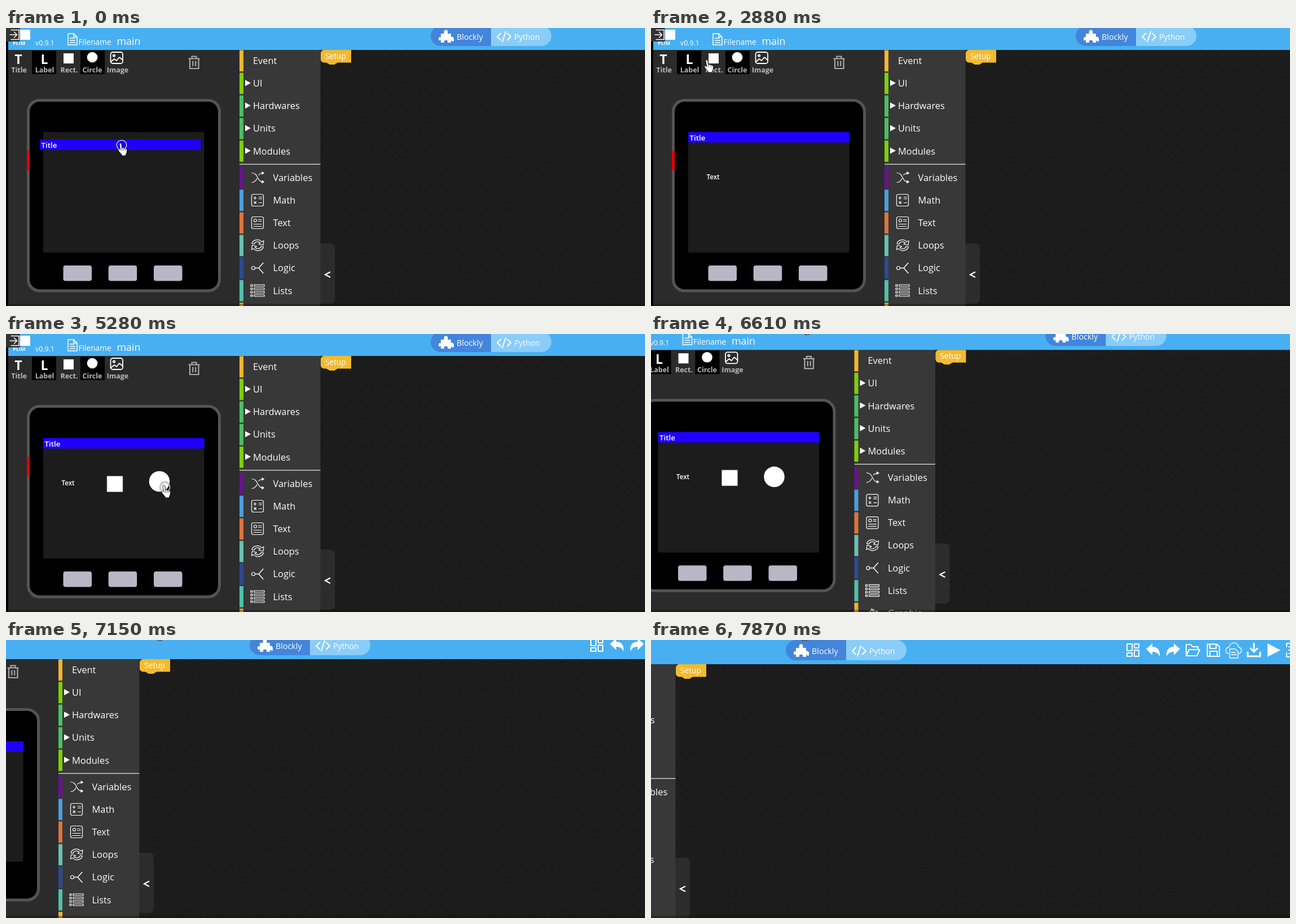
Write an HTML page that moves like this. It is 1133 by 494 pixels and loops after 7.99 s.

```html
<!DOCTYPE html>
<html lang="en">
<head>
<meta charset="utf-8">
<title>Block editor</title>
<style>
  html, body { margin: 0; width: 100%; height: 100%; overflow: hidden; background: #1c1c1c; }
  svg { display: block; width: 1133px; height: 494px; }
  text { font-family: "Open Sans", "Noto Sans", sans-serif; fill: #fff; }
  .line { fill: none; stroke: #fff; stroke-width: 1.2; stroke-linecap: round; stroke-linejoin: round; }
  .thick { stroke-width: 2; }
  .menu { font-size: 16.4px; }
  .tool { font-size: 12.5px; font-weight: 700; fill: #b9b9b9; text-anchor: middle; }
  .glyph { font-size: 23px; font-weight: 700; text-anchor: middle; }
  .white { fill: #fff; }
</style>
</head>
<body>
<svg viewBox="0 0 1133 494">
  <defs>
    <pattern id="dots" x="566" y="47" width="17.85" height="17.85" patternUnits="userSpaceOnUse">
      <rect width="1" height="1" fill="#4a4a4a"/>
    </pattern>
  </defs>

  <g id="page">
    <!-- workspace -->
    <rect x="557" y="39" width="1200" height="500" fill="#1c1c1c"/>
    <rect x="559" y="41" width="1200" height="500" fill="url(#dots)"/>
    <path d="M557 383h18a8 8 0 0 1 8 8v91a8 8 0 0 1-8 8h-18z" fill="#2c2c2c"/>
    <path class="line" d="M575 433.5l-9 4.7 9 4.7" style="stroke-width:2.2;stroke-linecap:butt;stroke-linejoin:miter"/>
    <path d="M558 45a6 6 0 0 1 6-6h48v22.500h-24l-6 3.500h-8l-6-3.500h-4a6 6 0 0 1-6-6z" fill="#f3ba2f"/>
    <text x="566" y="55" font-size="13.7">Setup</text>

    <!-- designer -->
    <rect x="0" y="39" width="414" height="500" fill="#2b2b2b"/>
    <path d="M46 40h43v42h-43zM132 40h43v42h-43z"/>
    <text class="glyph" x="22" y="64">T</text>
    <text class="glyph" x="68" y="64">L</text>
    <rect class="white" x="102" y="45" width="18" height="18"/>
    <circle class="white" cx="153" cy="52" r="9.300"/>
    <g class="line" style="stroke-width:1.8">
      <rect x="185.500" y="43" width="21.500" height="20" rx="3.500"/>
      <circle cx="191.500" cy="49" r="1.700"/>
      <path d="M186 60l6-5 4 3 5-6 6 5"/>
    </g>
    <text class="tool" x="23" y="79">Title</text>
    <text class="tool" x="68.500" y="79">Label</text>
    <text class="tool" x="112" y="79">Rect.</text>
    <text class="tool" x="153" y="79">Circle</text>
    <text class="tool" x="198" y="79">Image</text>
    <path class="line" d="M323.500 54.500h20M329.500 54v-3.500h8v3.500M326 55v17h15.500v-17M331.300 58.500v9.500M336.200 58.500v9.500"
      style="stroke:#a9a9a9;stroke-width:2.2;stroke-linecap:butt;stroke-linejoin:miter"/>

    <rect x="39.500" y="128.500" width="339" height="338.500" rx="20" stroke="#545454" stroke-width="5"/>
    <rect x="37" y="218" width="5" height="35" fill="#e80000"/>
    <rect x="66" y="185" width="285.500" height="214" fill="#1c1c1c"/>
    <g fill="#b9b6c5">
      <rect x="101.500" y="422" width="50.500" height="27.500" rx="4"/>
      <rect x="181.700" y="422" width="50.500" height="27.500" rx="4"/>
      <rect x="262" y="422" width="50.500" height="27.500" rx="4"/>
    </g>
    <g id="title">
      <rect width="285.500" height="18.500" fill="#1f00ff"/>
      <text x="2.500" y="15" font-size="13.3" font-weight="600">Title</text>
    </g>
    <text id="label" y="10" font-size="11.6" font-weight="600">Text</text>
    <rect id="rect" class="white" width="28" height="28" stroke="#999" stroke-width=".6"/>
    <circle id="disc" class="white" r="18.300"/>

    <!-- block menu -->
    <rect x="414" y="39" width="143.500" height="500" fill="#383838"/>
    <g id="menu"></g>
    <rect x="414" y="241.500" width="143.500" height="1.200" fill="#eee"/>
    <g class="line">
      <path d="M436 257.500c12 0 8 16 20 16M436 274.500c5 0 7-3 9-7M448 261c2-2 4-3 8-3"/>
      <path class="white" d="M454 255.500l4 2.300-4 2.300zM454 271l4 2.400-4 2.300z" style="stroke-width:.6"/>
      <rect x="435.500" y="295.500" width="21" height="21" rx="3"/>
      <path d="M439 302h5M441.500 299.500v5M448.500 300.500h5M448.500 303.500h5M440 308.500l3.500 3.500M443.500 308.500l-3.500 3.500M448.500 310.500h5"/>
      <rect x="435.500" y="335.500" width="21" height="21" rx="3"/>
      <circle cx="442" cy="342" r="2.500"/>
      <path d="M447.500 340.500h5.500M447.500 343.500h5.500M439 348.500h14M439 352.500h14"/>
      <path d="M436 383c2-7 13-9 17-3l4-2-1 8-8-2 3-2c-4-4-10-2-11 2zM456.500 389c-2 7-13 9-17 3l-4 2 1-8 8 2-3 2c4 4 10 2 11-2z"/>
      <circle cx="438.500" cy="426.500" r="3"/>
      <path d="M442 426.500h6l8-9M448 426.500l8 9" style="stroke-width:1.5"/>
      <path id="rows"/>
      <path d="M438 510l7-11 5 8 4-5 4 9M445 503a2.500 2.500 0 1 1 5 0"/>
    </g>

    <!-- top bar -->
    <rect x="0" y="-30" width="1757" height="69" fill="#48b0f2"/>
    <rect x="0" y="-30" width="4" height="560"/>
    <rect class="white" x="25" y="3" width="18" height="18"/>
    <text x="12" y="30" font-size="9" font-weight="700" textLength="">PLIM</text>
    <rect x="0" y="-30" width="24.500" height="54" fill="#323232"/>
    <path class="line" d="M7 12h12M14.500 7l5 5-5 5M9 3.500h14v17h-14" style="stroke-width:1.5"/>
    <text x="52" y="30.500" font-size="12.300">v0.9.1</text>
    <path class="line" d="M110 10h10l6 6v14h-16zM120 10v6h6M113.500 18h8M113.500 22h9M113.500 26h9" style="stroke-width:1.5"/>
    <text x="128.500" y="30" font-size="13.700">Filename</text>
    <text x="196.500" y="30" font-size="17.800">main</text>

    <path d="M860-4h-89a18 18 0 0 0 0 36h89z" fill="#4385db"/>
    <path d="M860-4h89a18 18 0 0 1 0 36h-89z" fill="#8acdf9"/>
    <path class="white" d="M771 10h6c-3-9 9-9 6 0h6v6c6-3 6 8 4 8 0 0-2 0-4-2v4h-6c2-6-8-6-6 0h-6v-5c-1 1-3 2-4 0 0-5 1-6 4-4z"/>
    <text x="799" y="21" font-size="14.300">Blockly</text>
    <path class="line thick" d="M877 9.500l-6 6 6 6M889 9.500l6 6-6 6M886 6.500l-6 18"/>
    <text x="901" y="21" font-size="13.800">Python</text>

    <g class="line thick">
      <path d="M1358 3h9v12h-9zM1371 3h8v7h-8zM1358 19h9v6h-9zM1371 14h8v11h-8z"/>
      <path d="M1463 24v-20h8l3 4h10v5M1463 24l5-11h19l-5 11z"/>
      <path d="M1500.500 3.500h17l4.500 4.500v17h-21.500zM1505 4v7h11v-7M1505 25v-9h13v9"/>
      <path d="M1538 20c-7-1-6-11 1-11 2-11 16-10 17 0 7 1 6 11-1 11M1540 12h10l5 5v11h-15zM1543 18h7M1543 22h9" style="stroke-width:1.3"/>
      <path d="M1583 2v13M1577 11l6 6 6-6M1572 18v7h22v-7" style="stroke-width:3"/>
      <path d="M1641 8v-6h6M1641 19v7h6M1655 2h6v6M1661 19v7h-6M1645 8h12M1645 14h12M1645 20h12"/>
    </g>
    <path class="white" d="M1392 12l11-10v6c9 0 14 6 13 17-3-6-7-8-13-8v6zM1452 12l-11-10v6c-9 0-14 6-13 17 3-6 7-8 13-8v6zM1607 2l23 12-23 12z"/>
  </g>

  <rect y="490" width="1133" height="4" fill="#14060c" opacity=".35"/>

  <g id="cursor">
    <path d="M-4-1.500c0-2.500 3.800-2.500 3.900 0l.6 7c.8-1.600 3-1.200 3.400.2 1-1 2.700-.4 3 .8 1.300-.7 2.700.1 2.700 1.500 0 4-.3 6-2 8.500v2.500h-7.600v-2c-2-2.500-4.500-5-6-7.500-.8-2 1.400-3 2.800-1.500l1 1z"
      fill="#fff" stroke="#000" stroke-width=".9"/>
    <path d="M.5 5.500v4M3.900 6v3.500M7 7v3" stroke="#000" stroke-width=".6"/>
    <g id="ring">
      <circle r="8.700" fill="none" stroke="#000" stroke-width="2.400" opacity=".6"/>
      <circle r="8.700" fill="none" stroke="#fff" stroke-width="1.200"/>
    </g>
  </g>
</svg>

<script>
const $ = id => document.getElementById(id);
const LOOP = 7990;

// [name, bar colour, top]
const groups = [
  ["Event", "#f5b52e"], ["UI", "#7cd00a"], ["Hardwares", "#4bbf62"], ["Units", "#4bbf62"], ["Modules", "#7cd00a"],
  ["Variables", "#6a1290"], ["Math", "#4a9de0"], ["Text", "#e0733a"], ["Loops", "#68c0b0"],
  ["Logic", "#2c4a94"], ["Lists", "#4fc0a8"], ["Graphic", "#f0b030"]
];
$("menu").innerHTML = groups.map(([name, color], i) => {
  const y = 39.5 + i * 40.15 + (i > 4 ? 7 : 0);
  const arrow = i > 0 && i < 5 ? `<path class="white" d="M424 ${y + 12.5}l10 5.5-10 5.5z"/>` : "";
  return `<rect x="414" y="${y}" width="7" height="37.6" fill="${color}"/>${arrow}
    <text class="menu" x="${i > 4 ? 473.5 : 438}" y="${y + 24.5}">${name}</text>`;
}).join("");
$("rows").setAttribute("d", [0, 1, 2, 3].map(i =>
  `M434 ${456 + i * 6}h3v3h-3zM440 ${456 + i * 6}h18v3h-18z`).join(""));

// Time in ms to picture count
const clock = [[0, 0], [150, 1], [820, 6], [1400, 10], [1680, 12], [2880, 21], [3690, 27],
  [5280, 39], [5790, 43], [6210, 46], [6610, 49], [7150, 53], [LOOP, 59]];

// [step, x, y]
const hand = [[0, 205, 208], [2, 207, 208], [4, 212, 207], [6, 212, 206], [7, 212, 206], [8, 165, 155],
  [10, 67, 60], [12, 68, 61], [13, 76, 68], [14, 90, 130], [16, 101, 236], [18, 126, 265], [19, 127, 266],
  [20, 113, 150], [21, 101, 60], [23, 101, 64], [26, 198, 258], [27, 206, 272], [28, 178, 150],
  [29, 156, 66], [30, 156, 68], [35, 234, 215], [37, 272, 258], [39, 282, 272], [40, 282, 274.5],
  [41, 281, 272], [43, 260, 70], [45, 261, 8], [46, 262, -18], [49, 273, -18], [53, 269, -18], [58, 268, -18]];
const pan = [[0, 0, 0], [47, 0, 0], [48, -14, -8], [49, -53.5, -10.7], [50, -112, -10],
  [53, -321, -5], [55, -425, -2], [58, -514, 4]];
const presses = [[0, 4], [12, 19], [22, 27], [30, 41]];

function at(track, k) {
  let i = 1;
  while (i < track.length - 1 && track[i][0] < k) i++;
  const a = track[i - 1], b = track[i];
  const u = Math.min(1, (k - a[0]) / (b[0] - a[0]));
  return a.slice(1).map((v, j) => v + (b[j + 1] - v) * u);
}

const move = (id, x, y) => $(id).setAttribute("transform", `translate(${x} ${y})`);
const show = (id, on) => $(id).setAttribute("visibility", on ? "visible" : "hidden");

// Item follows the hand from step `from` until dropped at step `to`
function drag(id, n, from, to, dx, dy) {
  const [x, y] = at(hand, Math.min(n, to));
  show(id, n >= from);
  move(id, x + dx, y + dy);
}

function draw(now) {
  const n = Math.floor(at(clock, now % LOOP)[0] + 0.03);
  move("page", ...at(pan, n));
  move("cursor", ...at(hand, n));
  show("ring", presses.some(([a, b]) => n >= a && n < b));
  if (n < 4) drag("title", n, 0, 4, -145, -10);
  else move("title", 66, 185);
  drag("label", n, 14, 19, -28.5, -7);
  drag("rect", n, 23, 27, -27, -19.5);
  drag("disc", n, 30, 40, -10, -10);
}

const start = performance.now();
function tick() {
  draw(performance.now() - start);
  requestAnimationFrame(tick);
}
tick();
</script>
</body>
</html>
```
